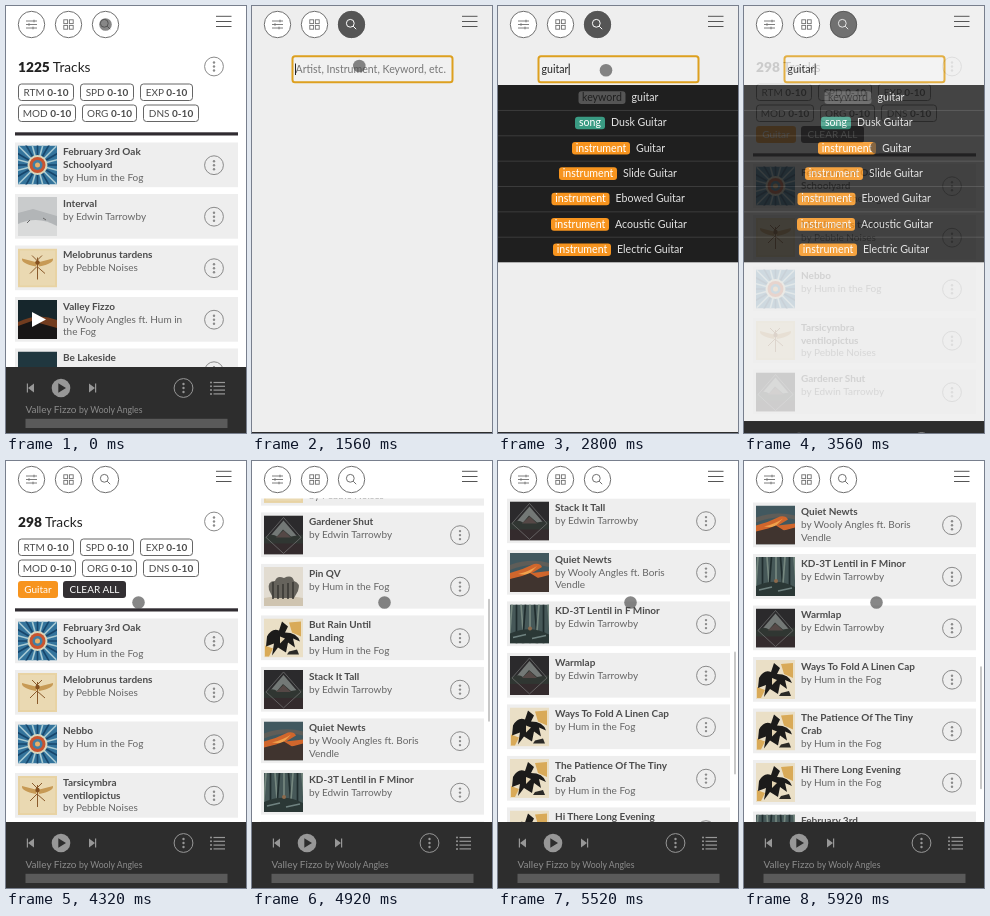
An HTML page for the animation above (6000 ms loop, 240x427 px).

```html
<!DOCTYPE html>
<html lang="en">
<head>
<meta charset="utf-8">
<title>Track search</title>
<style>
  html, body { margin: 0; width: 100%; height: 100%; overflow: hidden; background: #fff; }
  svg { display: block; width: 100vw; height: 100vh; font-family: Lato, "Open Sans", sans-serif; font-size: 10px; }
  text { white-space: pre; }
  .bold { font-weight: 700; }
</style>
</head>
<body>
<svg id="stage" viewBox="0 0 240 427"></svg>
<script>
const LOOP = 6000, PITCH = 51.5, ROW_TOP = 136, FILTER_SHIFT = 21;
const ICON = '#707070', PLAYER_ICON = '#979797';
const $ = id => document.getElementById(id);
const range = (n, fn) => Array.from({ length: n }, (_, i) => fn(i)).join('');
const rect = (x, y, w, h, fill, more = '') =>
  `<rect x="${x}" y="${y}" width="${w}" height="${h}" fill="${fill}" ${more}/>`;
const text = (x, y, body, fill = '#666', more = '') => `<text x="${x}" y="${y}" fill="${fill}" ${more}>${body}</text>`;
const path = (d, fill, more = '') => `<path d="${d}" fill="${fill}" ${more}/>`;
const stroke = (d, color, width = 1) => path(d, 'none', `stroke="${color}" stroke-width="${width}"`);
const circle = (x, y, r, fill, more = '') => `<circle cx="${x}" cy="${y}" r="${r}" fill="${fill}" ${more}/>`;

// Cover art, each on a 39 x 39 square
const covers = {
  burst: rect(0, 0, 39, 39, '#34749c') +
    range(24, i => `<g transform="rotate(${i * 15} 19.5 19.5)">` +
      stroke('M19.5 12V-7', i % 2 ? '#a8cbd4' : '#17466c', 1.6) + '</g>') +
    circle(19.5, 19.5, 10, '#d8d6bd') + circle(19.5, 19.5, 8, '#c9542f') +
    circle(19.5, 19.5, 5, '#417fa5') + circle(19.5, 19.5, 2.5, '#e9b06a'),
  snow: rect(0, 0, 39, 39, '#c9cbcc') + path('M0 16L15 12L39 19V39H0Z', '#b2b5b7') +
    path('M0 27Q20 18 39 29V39H0Z', '#d9dada') + stroke('M9 26l3-3M25 21l3 2', '#666'),
  insect: rect(0, 0, 39, 39, '#e8d3a4') + rect(2, 2, 35, 35, '#ead9b2') +
    path('M19.5 14L4 10Q3 15 18 18ZM19.5 14L35 10Q36 15 21 18Z', '#c79a55') +
    stroke('M19.5 9V31M12 25L19 18L27 25M14 7l5 5l5-5', '#8a5a2b') + circle(19.5, 14, 2.2, '#84501f'),
  sunset: rect(0, 0, 39, 39, '#41585f') + path('M0 12Q20 5 39 10V14Q20 9 0 17Z', '#5f5d58') +
    path('M0 20Q12 17 24 11Q30 10 32 14L22 20L39 18V24L0 27Z', '#d0662c') +
    path('M8 21Q20 18 27 13L18 22Z', '#f0a24c') + path('M0 26L12 23L20 20L28 25L39 22V39H0Z', '#40342f'),
  dusk: rect(0, 0, 39, 39, '#20373f') + path('M0 22Q20 12 39 20V29H0Z', '#a3562c') +
    path('M0 26L14 21L39 28V39H0Z', '#221f20'),
  peak: rect(0, 0, 39, 39, '#2b2a2c') + path('M19.5 5L34 22H5Z', '#737876') +
    path('M0 22Q8 17 13 21L19 14L27 21L39 19V30H0Z', '#303632') + path('M12 22L19.5 15L27 22Z', '#554846') +
    rect(0, 28, 39, 11, '#342b2d') + stroke('M19.5 2L37 22L19.5 38L2 22Z', '#777', .7),
  tree: rect(0, 0, 39, 39, '#e2dcd1') + path('M0 31Q19 27 39 31V39H0Z', '#cfc4b0') +
    path('M5 23Q3 14 11 14Q13 8 20 11Q28 7 30 14Q37 16 34 24L30 31H9Z', '#66635c') +
    range(5, i => stroke(`M${9 + i * 5} ${15 + i * 7 % 4}V32`, '#393632', 1.5)),
  ink: rect(0, 0, 39, 39, '#eadfc6') + path('M25 4L37 3V18L28 14ZM1 27L9 30L5 38H1Z', '#d9aa58') +
    path('M3 18Q8 9 15 12L18 3L24 8L21 14Q33 14 36 23L29 20L31 29L24 24L22 34L14 29L8 37L10 25L2 28Z', '#1c1b1a') +
    path('M16 18L21 20L16 25Z', '#e4d4b2') + path('M25 33L33 31L35 36H23Z', '#2b2a27'),
  forest: rect(0, 0, 39, 39, '#465858') +
    range(9, i => stroke(`M${2 + i * 4.5} 0l${i % 3 * 3 - 3} 39`, i % 2 ? '#202d2e' : '#75877f', 1.7)) +
    path('M0 29Q20 20 39 30V39H0Z', '#2b3836') + stroke('M3 33L16 30M22 34L36 31', '#6f8280', 1.5) +
    circle(20, 24, 2, '#8d6a4c')
};

const FOG = ['by Hum in the Fog'], EDWIN = ['by Edwin Tarrowby'], PEBBLE = ['by Pebble Noises'];
const schoolyard = ['burst', ['February 3rd Oak', 'Schoolyard'], FOG];
const beetle = ['insect', ['Melobrunus tardens'], PEBBLE];
const allTracks = [
  schoolyard,
  ['snow', ['Interval'], EDWIN],
  beetle,
  ['dusk', ['Valley Fizzo'], ['by Wooly Angles ft. Hum in', 'the Fog'], true],
  ['dusk', ['Be Lakeside'], ['by Wooly Angles ft.', 'Boris Vendle']]
];
const guitarTracks = [
  schoolyard,
  beetle,
  ['burst', ['Nebbo'], FOG],
  ['insect', ['Tarsicymbra', 'ventilopictus'], PEBBLE],
  ['peak', ['Gardener Shut'], EDWIN],
  ['tree', ['Pin QV'], FOG],
  ['ink', ['But Rain Until', 'Landing'], FOG],
  ['peak', ['Stack It Tall'], EDWIN],
  ['sunset', ['Quiet Newts'], ['by Wooly Angles ft. Boris', 'Vendle']],
  ['forest', ['KD-3T Lentil in F Minor'], EDWIN],
  ['peak', ['Warmlap'], EDWIN],
  ['ink', ['Ways To Fold A Linen Cap'], FOG],
  ['ink', ['The Patience Of The Tiny', 'Crab'], FOG],
  ['ink', ['Hi There Long Evening'], FOG],
  ['forest', ['February 3rd'], FOG]
];

const more = (x, y, color = '#8a8a8a') => circle(x, y, 9.4, 'none', `stroke="${color}"`) +
  range(3, i => circle(x, y - 4 + i * 4, 1.2, color));

function trackRow([cover, title, artist, playing], i) {
  const lines = [...title, ...artist].map((s, n) => n < title.length
    ? text(57, 13.4 + n * 12.7, s, '#4c4c4c', 'class="bold"')
    : text(57, 13.4 + n * 12.7, s));
  const overlay = playing ? rect(0, 0, 39, 39, '#000', 'opacity=".3"') + path('M14 12L28 19.5L14 27Z', '#fff') : '';
  return `<g transform="translate(0 ${ROW_TOP + i * PITCH})">` + rect(9, .5, 223, 44.7, '#eee') +
    `<svg x="12" y="3.5" width="39" height="39" viewBox="0 0 39 39">${covers[cover]}${overlay}</svg>` +
    lines.join('') + more(208, 23.2) + '</g>';
}

const chip = (x, y, w, name) => rect(x, y, w, 16.5, '#fff', 'rx="3" stroke="#666"') +
  text(x + w / 2, y + 11.8, `${name} <tspan class="bold">0-10</tspan>`, '#4c4c4c', 'text-anchor="middle"');
const button = (x, y, w, label, fill) => rect(x, y, w, 17, fill, 'rx="3"') +
  text(x + w / 2, y + 12, label, '#fff', 'text-anchor="middle"');

function trackList(id, count, tracks, filtered) {
  const shift = filtered ? FILTER_SHIFT : 0;
  return `<g id="${id}">` +
    text(12, 66, `<tspan font-weight="900">${count}</tspan> Tracks`, '#222', 'font-size="13.7"') + more(208, 60.5) +
    chip(12.5, 78, 55, 'RTM') + chip(74.5, 78, 53, 'SPD') + chip(134.5, 78, 52, 'EXP') +
    chip(12.5, 99, 57, 'MOD') + chip(76.5, 99, 54, 'ORG') + chip(137.5, 99, 55, 'DNS') +
    (filtered ? button(12, 120, 40, 'Guitar', '#f7941e') + button(57, 120, 63, 'CLEAR ALL', '#333033') : '') +
    `<g transform="translate(0 ${shift})">` + rect(9, 126.3, 223, 3.2, '#302c31') +
    tracks.map(trackRow).join('') + '</g></g>';
}

const suggestions = [
  [80.5, 'keyword', 'guitar'], [77, 'song', 'Dusk Guitar'], [74, 'instrument', 'Guitar'],
  [61, 'instrument', 'Slide Guitar'], [53.5, 'instrument', 'Ebowed Guitar'],
  [53, 'instrument', 'Acoustic Guitar'], [55, 'instrument', 'Electric Guitar']
];
const tagStyle = { keyword: [47, '#555', '#1f1f1f'], song: [30, '#3a9b83', '#fff'], instrument: [58, '#f7941e', '#fff'] };

function suggestion([x, tag, label], i) {
  const [w, fill, ink] = tagStyle[tag], y = 91.6 + i * 25.35;
  return (i ? rect(0, y - 13, 240, 1, '#3b3b3b') : '') + rect(x, y - 6.3, w, 12.6, fill, 'rx="3"') +
    text(x + w / 2, y + 3.4, tag, ink, 'text-anchor="middle" font-size="10.6"') +
    text(x + w + 6, y + 3.4, label, '#e4e4e4', 'font-size="10.6"');
}

const magnifier = color => circle(98.3, 17.3, 3.9, 'none', `stroke="${color}"`) + stroke('M101.2 20.2L104.2 23.2', color);
const header =
  [25.5, 62.5, 99.5].map(x => circle(x, 18.5, 13.2, '#fff', `stroke="${ICON}"`)).join('') +
  stroke('M20 15H31M20 18.5H31M20 22H31M28 13.7v2.6M23 17.2v2.6M27 20.7v2.6', ICON, .9) +
  range(4, i => rect(57.8 + i % 2 * 5.6, 13.8 + (i >> 1) * 5.6, 3.8, 3.8, 'none', `stroke="${ICON}" stroke-width=".9"`)) +
  magnifier(ICON) + `<g id="active">${circle(99.5, 18.5, 13.5, '#555')}${magnifier('#fff')}</g>` +
  stroke('M210 10.3H225.5M210 15.5H225.5M210 20.5H225.5', '#555');

const player = rect(0, 361, 240, 67, '#2d2d2d') +
  path('M28 377.5V386.5L22 382ZM20.8 377.5h1.2v9h-1.2ZM83 377.5V386.5L89 382ZM89 377.5h1.2v9H89Z', PLAYER_ICON) +
  circle(55, 382, 9.3, PLAYER_ICON) + path('M52.3 377.3L60 382L52.3 386.7Z', '#2d2d2d') + more(177.5, 382, PLAYER_ICON) +
  range(4, i => circle(205, 376.5 + i * 3.8, 1, PLAYER_ICON) + rect(207.5, 375.9 + i * 3.8, 11.5, 1.2, PLAYER_ICON)) +
  text(19.5, 407, 'Valley Fizzo <tspan font-size="8.7">by Wooly Angles</tspan>', '#8c8c8c') +
  rect(19.5, 412.8, 202, 9.2, '#5a5a5a');

$('stage').innerHTML = rect(0, 0, 240, 427, '#fff') +
  trackList('all', 1225, allTracks, false) + trackList('filtered', 298, guitarTracks, true) +
  rect(0, 0, 240, 37.5, '#fff') + rect(236, 40, 2, 123, '#c8c8c8', 'id="scrollbar" rx="1"') +
  `<g id="search">${rect(0, 0, 240, 427, '#eee')}${rect(40.5, 50.3, 160, 26, '#f1f1f1', 'id="field" rx="2.5"')}` +
  text(43.5, 67, '', '#777', 'id="query" font-size="10.6"') + rect(43, 57.5, 1, 11.5, '#222', 'id="caret"') +
  `<g id="menu">${rect(0, 79, 240, 177.3, '#1f1f1f')}${suggestions.map(suggestion).join('')}</g></g>` +
  header + `<g id="player">${player}</g>` + circle(0, 0, 6.3, '#444', 'id="pointer" opacity=".64"');

const clamp = v => Math.min(1, Math.max(0, v));
const ease = (t, from, to) => { const u = clamp((t - from) / (to - from)); return u * u * (3 - 2 * u); };
const set = (id, attrs) => { for (const k in attrs) $(id).setAttribute(k, attrs[k]); };

// A quick push followed by a long glide
function scrollAt(t) {
  const s = Math.max(0, t - 4640);
  return 155 * (1 - (1 + s / 40) * Math.exp(-s / 40)) + 423 * (1 - Math.exp(-s / 600));
}

function render(t) {
  const open = ease(t, 40, 600) - ease(t, 3420, 3960);
  const filtered = t >= 3440, focused = t >= 1320;
  const typed = 'guitar'.slice(0, t < 1760 ? 0 : 1 + Math.floor((t - 1760) / 110));
  const scroll = scrollAt(t);

  set('all', { display: filtered ? 'none' : 'inline' });
  set('filtered', { display: filtered ? 'inline' : 'none', transform: `translate(0 ${-scroll})` });
  set('scrollbar', { y: 40 + scroll * .313, opacity: t >= 4680 ? 1 : 0 });

  set('search', { opacity: open });
  set('active', { opacity: open });
  set('player', { transform: `translate(0 ${65 * open})` });
  set('field', { stroke: focused ? '#dda01f' : '#aaa', 'stroke-width': focused ? 2 : 1 });
  $('query').textContent = typed || 'Artist, Instrument, Keyword, etc.';
  set('query', { fill: typed ? '#222' : '#777' });
  set('caret', { x: typed ? 43.8 + $('query').getComputedTextLength() : 43, opacity: focused ? 1 : 0 });
  set('menu', { opacity: ease(t, 1960, 2120) });

  const toField = ease(t, 680, 1280), drift = ease(t, 1760, 2360), toRow = ease(t, 2800, 3400);
  set('pointer', {
    cx: 99.5 + 7.8 * toField + .7 * drift + 24.5 * toRow,
    cy: 18.5 + 41.5 * toField + 4.3 * drift + 77.2 * toRow
  });
}

const start = performance.now();
function tick() {
  render((performance.now() - start) % LOOP);
  requestAnimationFrame(tick);
}
tick();
</script>
</body>
</html>
```
